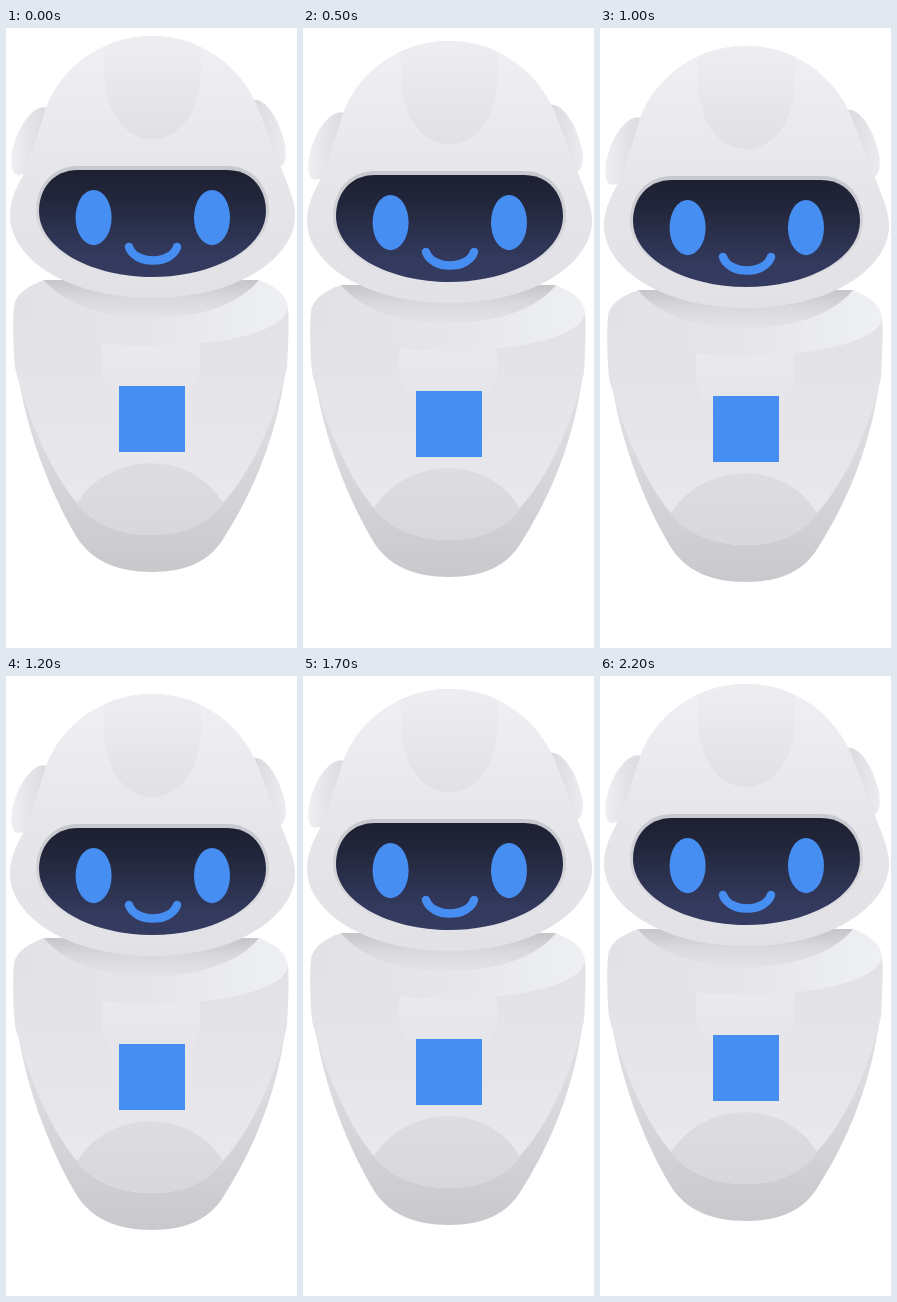
These frames come from a looping animation (291x620 px, 2.3 s). An HTML page:

```html
<!DOCTYPE html>
<html lang="en">
<head>
<meta charset="utf-8">
<title>Floating robot</title>
<style>
  html, body { margin: 0; width: 100%; height: 100%; overflow: hidden; background: #fff; }
  svg { display: block; }
</style>
</head>
<body>
<svg width="291" height="620" viewBox="0 0 291 620">
  <defs>
    <linearGradient id="shell" x2="0" y2="1"><stop stop-color="#eff0f4"/><stop offset=".55" stop-color="#e6e6ea"/><stop offset="1" stop-color="#e2e1e6"/></linearGradient>
    <linearGradient id="crest" x2="0" y2="1"><stop stop-color="#edeef2"/><stop offset="1" stop-color="#e1e0e5"/></linearGradient>
    <linearGradient id="earL"><stop stop-color="#eeeff2"/><stop offset="1" stop-color="#dbdbdf"/></linearGradient>
    <linearGradient id="earR"><stop stop-color="#d9d9dd"/><stop offset="1" stop-color="#ebecf0"/></linearGradient>
    <linearGradient id="rim" x2="0" y2="1"><stop stop-color="#c8c9ce"/><stop offset=".5" stop-color="#d4d4d9"/><stop offset="1" stop-color="#e4e3e8"/></linearGradient>
    <linearGradient id="visor" x2="0" y2="1"><stop stop-color="#1d2031"/><stop offset=".25" stop-color="#22263b"/><stop offset=".8" stop-color="#333a5e"/><stop offset="1" stop-color="#343b60"/></linearGradient>
    <linearGradient id="hull" x2="0" y2="1"><stop stop-color="#e3e2e7"/><stop offset=".5" stop-color="#dbdbdf"/><stop offset="1" stop-color="#c9c9cd"/></linearGradient>
    <linearGradient id="front" x2="0" y2="1"><stop stop-color="#e2e1e6"/><stop offset="1" stop-color="#eaeaee"/></linearGradient>
    <linearGradient id="belly" x2="0" y2="1"><stop stop-color="#dddce1"/><stop offset="1" stop-color="#d8d8dc"/></linearGradient>
    <linearGradient id="collar"><stop stop-color="#e2e1e6"/><stop offset=".5" stop-color="#e6e6ea"/><stop offset="1" stop-color="#eef0f3"/></linearGradient>
    <linearGradient id="neck" x2="0" y2="1"><stop stop-color="#c6c6ca"/><stop offset=".5" stop-color="#dadade"/><stop offset="1" stop-color="#e3e2e7"/></linearGradient>
    <linearGradient id="strip" x2="0" y2="1"><stop stop-color="#eaebef"/><stop offset="1" stop-color="#e5e5e9"/></linearGradient>
    <clipPath id="skull"><use href="#head-shape"/></clipPath>
  </defs>

  <g id="body">
    <path fill="url(#hull)" d="M8 279C4 350 30 440 70 508C85 533 112 544 146 544C180 544 205 533 219 508C262 440 286 360 282 279Z"/>
    <path fill="url(#front)" d="M8 279Q6 310 9 340C24 398 48 448 71 475C88 498 118 507 146 507C174 507 201 498 217 475C244 445 267 398 281 340Q283 310 282 279Z"/>
    <path fill="url(#belly)" d="M71 475C105 422 185 422 217 475C201 498 174 507 146 507C118 507 88 498 71 475Z"/>
    <path fill="url(#strip)" d="M96 300H194V336Q194 378 146 378Q96 378 96 336Z"/>
    <path fill="url(#collar)" d="M8 279C9 266 22 258 38 252H253C271 259 281 268 282 279C282 301 222 318 146 318C68 318 8 301 8 279Z"/>
    <path fill="url(#neck)" d="M38 252C58 277 98 290 146 290C192 290 233 277 253 252Z"/>
    <rect x="113" y="358" width="66" height="66" fill="#468ef2"/>
  </g>

  <g id="head">
    <path fill="url(#earL)" d="M41 80C28 75 11 99 6 124C4 138 6 147 13 147L24 144Z"/>
    <path fill="url(#earR)" d="M246 72C260 69 273 91 279 116C281 129 279 137 274 139L262 135Z"/>
    <path id="head-shape" fill="url(#shell)" d="M146 8C97 8 56 38 40 80C32 105 27 125 17 147C10 160 4 173 4 188C4 228 58 270 146 270C235 270 289 228 289 188C289 173 283 160 275 140C267 123 260 100 252 80C235 38 195 8 146 8Z"/>
    <path clip-path="url(#skull)" fill="url(#crest)" d="M98 8H195V42C195 84 173 111 146 111C119 111 98 84 98 42Z"/>
    <path fill="url(#rim)" d="M72 138H221C247 138 263 158 263 183C263 223 207 251 146 251C86 251 30 223 30 183C30 158 46 138 72 138Z"/>
    <path fill="url(#visor)" d="M72 142H221C246 142 260 161 260 183C260 222 205 249 146 249C88 249 33 222 33 183C33 161 47 142 72 142Z"/>
    <g fill="#468ef2">
      <ellipse cx="87.6" cy="189.6" rx="18" ry="27.6"/>
      <ellipse cx="206" cy="189.6" rx="18" ry="27.6"/>
    </g>
    <path fill="none" stroke="#468ef2" stroke-width="8.5" stroke-linecap="round" d="M123 219C129 237 165 237 171 219"/>
  </g>
</svg>
<script>
  const LOOP = 2300, STEP = 100, PEAK = 11;
  const body = document.getElementById('body');
  const head = document.getElementById('head');
  const shift = (part, y) => part.setAttribute('transform', `translate(0 ${y})`);

  // One pixel per step down, then back up; the body settles one step after the head.
  function draw(now) {
    const step = Math.floor(now % LOOP / STEP);
    const drop = PEAK - Math.abs(step - PEAK);
    shift(head, drop);
    shift(body, step > PEAK ? Math.max(1, drop) : drop);
    requestAnimationFrame(draw);
  }
  draw(0);
</script>
</body>
</html>
```
